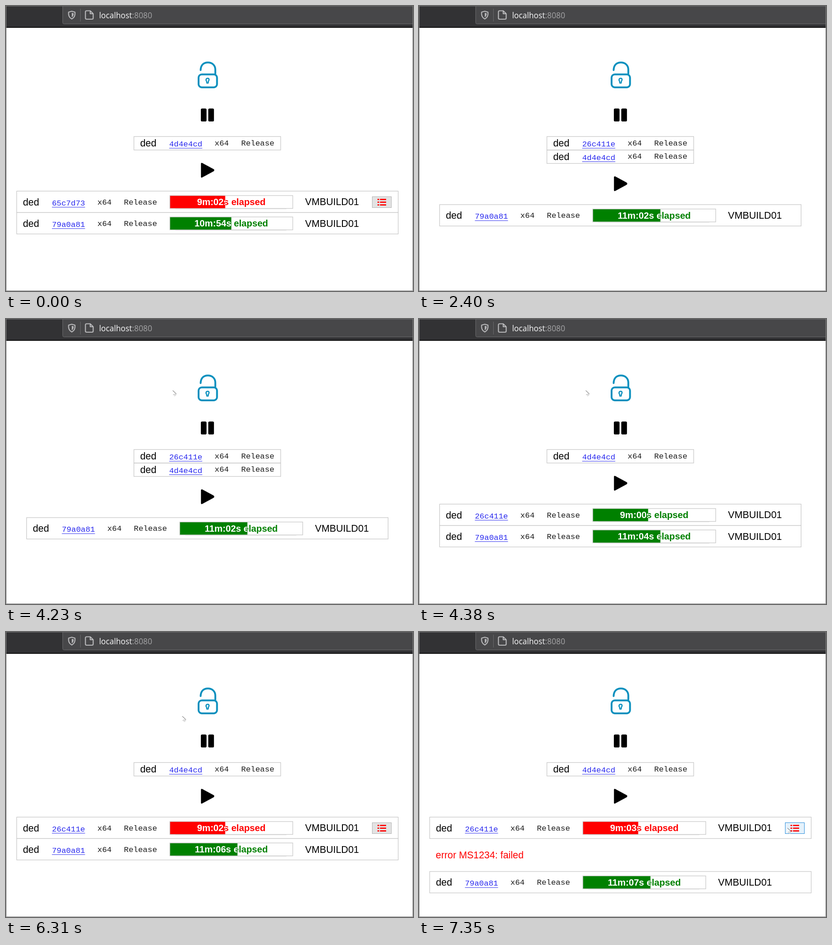
Animation, 894 px wide and 627 px high, one loop 8 s. Source, as an HTML page:

```html
<!DOCTYPE html>
<html lang="en">
<head>
<meta charset="utf-8">
<title>Build queue</title>
<style>
  html, body { margin: 0; width: 100%; height: 100%; overflow: hidden; background: #fff; }
  svg { display: block; }
  text { font: 21.3px "Liberation Sans", Arial, sans-serif; white-space: pre; }
  .url { font: 17.3px "Open Sans", sans-serif; }
  .mono { font: 17.33px "Liberation Mono", "Courier New", monospace; fill: #1c1c1c; }
  .link { fill: #2a2aee; }
  .time { font-size: 20.2px; font-weight: bold; text-anchor: middle; }
  .line { fill: none; stroke: #c9c9c9; stroke-width: 1.3; }
  .chrome { fill: none; stroke: #b9b9bb; stroke-width: 2.2; stroke-linejoin: round; }
  .lock { fill: none; stroke: #0b90be; stroke-width: 4; stroke-linecap: round; stroke-linejoin: round; }
</style>
</head>
<body>
<svg width="894" height="627" viewBox="0 0 894 627">
  <rect width="894" height="627" fill="#fff"/>
  <rect width="894" height="47" fill="#323234"/>
  <path d="M124.5 0V36.5Q124.5 39.5 127.5 39.5H894V0Z" fill="#474749" stroke="#6b6b6d"/>
  <path d="M163.5 6V34" stroke="#6b6b6d"/>
  <rect y="46" width="894" height="2" fill="#0c0c0d"/>

  <path class="chrome" d="M144.500 11.500L151.500 13.500V18Q151 25 144.500 28.500Q138 25 137.500 18V13.500Z"/>
  <path d="M144.500 15L148.500 16V18.500Q148 22.500 144.500 25Z" fill="#b9b9bb"/>
  <path class="chrome" d="M177 10.500H185L191.500 17V26.500Q191.500 29 189 29H177Q174.500 29 174.500 26.500V13Q174.500 10.500 177 10.500ZM185 10.500V17H191.500"/>
  <text class="url" x="204.500" y="27" fill="#f9f9fa">localhost<tspan fill="#a5a5a7">:8080</tspan></text>

  <g class="lock">
    <path d="M427.500 141C428 130 434 124.300 443.500 124.300C453 124.300 459.800 130.500 459.800 140V149"/>
    <rect x="423" y="150.500" width="40.500" height="28.500" rx="7"/>
    <path d="M440.600 165.500Q438.800 163.500 439.500 161.500Q440.500 159 443 159Q445.800 159 446 162Q446 164 444.500 165.500L444 169.500H441.200Z" stroke-width="2.600"/>
  </g>
  <rect x="428" y="225.500" width="12.500" height="28.500" rx="2.800"/>
  <rect x="444.300" y="225.500" width="12.500" height="28.500" rx="2.800"/>

  <g id="scene"></g>
  <g id="cursor" fill="none">
    <path d="M0 0V12L3 9.500L5 13L7 12L5.500 8.500H8.500Z" fill="#fff"/>
    <path d="M.3 .3L8.300 8" stroke="#444" stroke-width="1"/>
    <path d="M1 9.800L3.500 8.500L7.500 9M3.500 10.300L5 12.800M6 10L7 11.500" stroke="#888" stroke-width=".8"/>
  </g>
  <path d="M0 .5H894" stroke="#68686a"/>
  <path d="M.5 0V626.500H893.500V0" fill="none" stroke="#7c7c7c"/>
</svg>
<script>
const LOOP = 8000;
const RED = "#f00", GREEN = "#008000";
const scene = document.getElementById("scene");
const cursor = document.getElementById("cursor");

const job = (hash, time, pct, failed) => ({ hash, time, pct, failed });
const old = (time, pct) => job("79a0a81", time, pct);
const next = (time, failed) => job("26c411e", time, 45, failed);
const waiting = ["4d4e4cd"];

const states = [
  { at: 0, queue: waiting, jobs: [job("65c7d73", "9m:02s", 45, true), old("10m:54s", 50)] },
  { at: 500, queue: waiting, jobs: [old("11m:00s", 55)] },
  { at: 2400, queue: ["26c411e", ...waiting], jobs: [old("11m:02s", 55)] },
  { at: 4380, queue: waiting, jobs: [next("9m:00s"), old("11m:04s", 55)] },
  { at: 6310, queue: waiting, jobs: [next("9m:02s", true), old("11m:06s", 55)] },
  { at: 6730, queue: waiting, hover: true, jobs: [next("9m:02s", true), old("11m:06s", 55)] },
  { at: 7350, queue: waiting, hover: true, error: "error MS1234: failed",
    jobs: [next("9m:03s", true), old("11m:07s", 55)] }
];

// time, x, y; a bare time hides the pointer
const moves = [
  [0],
  [3210, 592, 534], [3330, 622, 508], [3450, 656, 478], [3570, 694, 444], [3690, 729, 413],
  [3840, 820, 448], [3960, 354, 176], [4110, 360, 167], [4230, 366, 157],
  [5070], [5210, 848, 409], [5330, 868, 421], [5760, 874, 426], [5880, 369, 190],
  [6030, 393, 190], [6160, 390, 188], [6310, 387, 185], [6430, 872, 428],
  [6590, 845, 423], [6730, 822, 429], [6850, 809, 431]
];

const text = (x, y, s, cls = "", fill = "") =>
  `<text x="${x}" y="${y}" class="${cls}"${fill && ` fill="${fill}"`}>${s}</text>`;
const box = (x, y, w, h) => `<rect class="line" x="${x}" y="${y}" width="${w}" height="${h}"/>`;

function label(x, cy, hash) {
  return text(x + 13.7, cy + 7.7, "ded")
    + text(x + 77.4, cy + 7.7, hash, "mono link")
    + `<path d="M${x + 77.4} ${cy + 11.6}h72.8" stroke="#2a2aee"/>`
    + text(x + 177.3, cy + 5.5, "x64", "mono")
    + text(x + 235.5, cy + 5.5, "Release", "mono");
}

function bar(x, cy, { time, pct, failed }, id) {
  const color = failed ? RED : GREEN, top = cy - 14, fill = 269 * pct / 100;
  const caption = c => text(x + 135, cy + 7.3, time + " elapsed", "time", c);
  return `<clipPath id="c${id}"><rect x="${x}" y="${top}" width="${fill + 0.6}" height="28.4"/></clipPath>`
    + `<path d="M${x + 12} ${cy + 15.5}H${x + 256}" stroke="#e6e6e6"/>`
    + `<rect x="${x}" y="${top}" width="270" height="28.4" fill="#fff"/>`
    + caption(color)
    + `<g clip-path="url(#c${id})"><rect x="${x}" y="${top}" width="270" height="28.4" fill="${color}"/>${caption("#fff")}</g>`
    + box(x, top, 270, 28.4);
}

function button(x, cy, hover) {
  const rows = [-6, 0, 6].map(d =>
    `<path d="M${x + 11.5} ${cy + d + 0.7}h3.600m1.900 0h13.500" stroke="${RED}" stroke-width="2.700"/>`).join("");
  return `<rect x="${x}" y="${cy - 11.5}" width="42" height="24" fill="${hover ? "#e5f1fb" : "#e3e3e3"}"`
    + ` stroke="${hover ? "#2b8edb" : "#b3b3b3"}"/>` + rows;
}

function draw({ queue, jobs, hover, error }) {
  const rowH = 29.6, shift = (queue.length - 1) * rowH;
  let out = queue.map((hash, i) => box(281, 287.2 + i * rowH, 322.4, rowH) + label(281, 301.3 + i * rowH, hash)).join("");
  out += `<path transform="translate(0 ${shift})" d="M430 346.800L455 360.300Q456.500 361.300 455 362.300L430 375.800Z" stroke="#000" stroke-width="3.500" stroke-linejoin="round"/>`;

  const wide = jobs.some(j => j.failed);
  const x = wide ? 23.5 : 45.3, w = wide ? 838 : 794;
  let top = 407.3 + shift;
  jobs.forEach((j, i) => {
    const cy = top + 23.7;
    out += box(x, top, w, 47.1) + label(x, cy, j.hash) + bar(x + 336.4, cy, j, i)
      + text(x + 633.5, cy + 7.4, "VMBUILD01");
    if (j.failed) out += button(804.5, cy, hover);
    top += 47.1;
    if (error && j.failed) {
      out += text(36.8, 498.3, error, "", RED);
      top += 72.5;
    }
  });
  scene.innerHTML = out;
}

const latest = (list, t, key) => list.findLast(s => s[key] <= t);
const start = performance.now();
let shown;

function tick() {
  const t = Math.max(0, performance.now() - start) % LOOP;
  const state = latest(states, t, "at");
  if (state !== shown) draw(shown = state);
  const [, x, y] = latest(moves, t, 0);
  cursor.style.display = x === undefined ? "none" : "";
  if (x !== undefined) cursor.setAttribute("transform", `translate(${x} ${y})`);
  requestAnimationFrame(tick);
}
tick();
</script>
</body>
</html>
```
